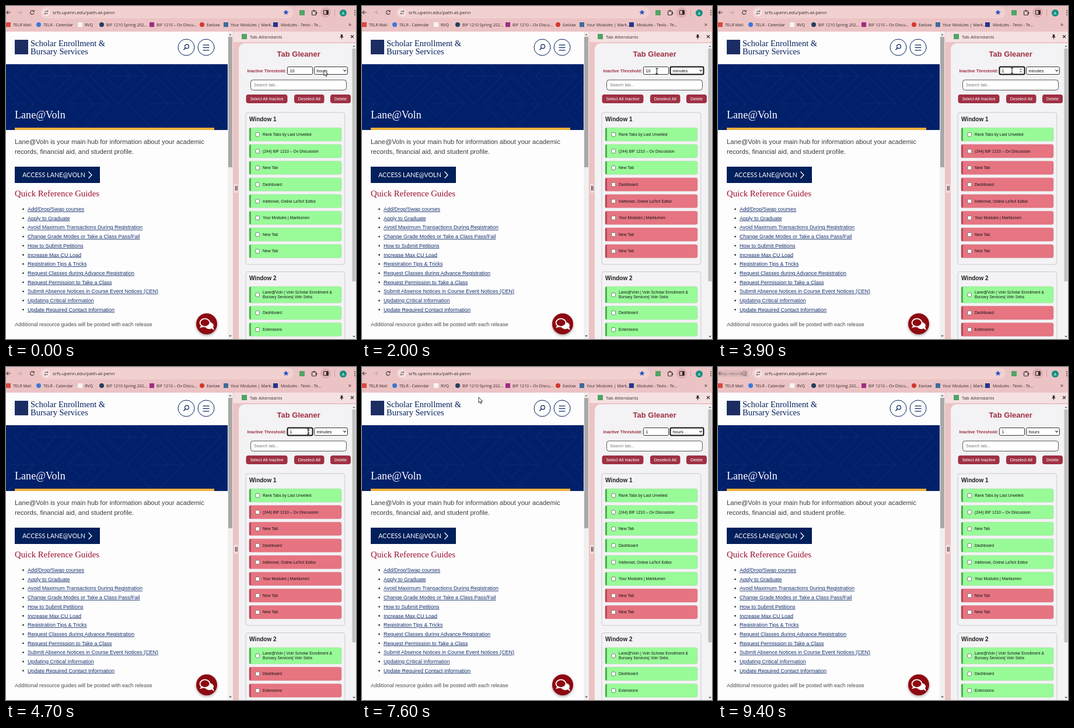
An HTML page for the animation above (9500 ms loop, 600x572 px).

```html
<!DOCTYPE html>
<html lang="en">
<head>
<meta charset="utf-8">
<title>Tab manager demo</title>
<style>
html, body { margin: 0; width: 100%; height: 100%; overflow: hidden; }
#stage { display: block; }
.sans { font-family: "Liberation Sans", Arial, sans-serif; }
.serif { font-family: "Liberation Serif", Times, serif; }
.ui { font-family: "Open Sans", "Noto Sans", sans-serif; }
.label { font-family: Lato, sans-serif; }
.bold { font-weight: 700; }
.link { text-decoration: underline; }
.shadow { filter: drop-shadow(0 2px 2px rgba(0, 0, 0, .35)); }
</style>
</head>
<body>
<svg id="stage" width="600" height="572" viewBox="0 0 600 572">
  <g id="still"></g>
  <g id="live"></g>
</svg>
<script>
const LOOP = 9500;
const NAVY = '#011f5b', MAROON = '#9f3043', PINK = '#ecc3c4', PANEL = '#f3f2f4';

// Moments at which the interface changes
const T = { open: 400, minutes: 1100, focus: 2200, erase: 3700, reopen: 5600, hours: 6800, blur: 9000, tip: 9100 };

// Pointer stops: time, x, y
const stops = [
  [0, 545, 110], [350, 545, 111], [800, 546, 134], [1200, 546, 134], [2100, 504, 111],
  [4000, 504, 111], [4500, 518, 111], [4900, 518, 111], [5500, 560, 109], [5800, 560, 110],
  [6250, 549, 131], [6500, 549, 131], [6750, 546, 141], [6950, 546, 141], [7550, 200, 52],
  [7750, 200, 52], [8100, 185, -16], [LOOP, 185, -16]
];

const bookmarks = [
  [4, '#d94a3d', 'TELR Mail', 12], [56, '#3b78d8', 'TELR - Calendar', 64],
  [127, '#f5f5f5', 'RVQ', 135], [164, '#24405e', 'BIF 1210 Spring 202...', 172],
  [250, '#a02c83', 'BIF 1210 – Ov Discu...', 258], [336, '#d5372d', 'Easlow', 344],
  [377, '#3d6b9d', 'Your Modules | Mark...', 385], [462, '#24358c', 'Modules - Tevio - Te...', 471]
];

const links = [
  'Add/Drop/Swap courses', 'Apply to Graduate', 'Avoid Maximum Transactions During Registration',
  'Change Grade Modes or Take a Class Pass/Fail', 'How to Submit Petitions', 'Increase Max CU Load',
  'Registration Tips & Tricks', 'Request Classes during Advance Registration',
  'Request Permission to Take a Class', 'Submit Absence Notices in Course Event Notices (CEN)',
  'Updating Critical Information', 'Update Required Contact Information'
];

const firstWindow = [
  'Rank Tabs by Last Unveiled', '(244) BIF 1210 – Ov Discussion', 'New Tab', 'Dashboard',
  'Inkfennel, Online LaTeX Editor', 'Your Modules | Marklumen', 'New Tab', 'New Tab'
];

const units = ['seconds', 'minutes', 'hours', 'days'];

const paint = (fill, stroke, width = 1) =>
  `fill="${fill || 'none'}"` + (stroke ? ` stroke="${stroke}" stroke-width="${width}"` : '');
const text = (str, x, y, size, color, style = 'sans', anchor = 'start') =>
  `<text x="${x}" y="${y}" font-size="${size}" fill="${color}" class="${style}" text-anchor="${anchor}">${str.replace(/&/g, '&amp;')}</text>`;
const box = (x, y, w, h, r, ...look) =>
  `<rect x="${x}" y="${y}" width="${w}" height="${h}" rx="${r}" ${paint(...look)}/>`;
const rect = (x, y, w, h, color) => box(x, y, w, h, 0, color);
const oval = (x, y, rx, ry, ...look) =>
  `<ellipse cx="${x}" cy="${y}" rx="${rx}" ry="${ry}" ${paint(...look)}/>`;
const circle = (x, y, r, ...look) => oval(x, y, r, r, ...look);
const poly = (points, fill, stroke, width) =>
  `<poly${fill ? 'gon' : 'line'} points="${points}" ${paint(fill, stroke, width)}/>`;
const each = (list, render) => list.map(render).join('');

// Small triangle pointing up (dir -1) or down (dir 1)
const triangle = (x, y, dir, color, r = 2.5) =>
  poly([x - r, y - dir * r / 2, x + r, y - dir * r / 2, x, y + dir * r / 2], color);

function star(x, y) {
  return poly(Array.from({ length: 10 }, (_, i) => {
    const r = i % 2 ? 2.1 : 5, a = i * Math.PI / 5 - Math.PI / 2;
    return [x + r * Math.cos(a), y + r * Math.sin(a)];
  }), '#1f4fc0');
}

function toolbar() {
  return rect(0, 0, 600, 44, PINK) +
    box(59, 1, 434, 20, 10, '#f1d0d0') +
    poly([8, 11, 1, 11, 4, 8, 1, 11, 4, 14], null, '#4b3f43', 1.1) +
    poly([20, 11, 27, 11, 24, 8, 27, 11, 24, 14], null, '#b89a9d', 1) +
    `<circle cx="45" cy="11" r="3.3" stroke-dasharray="17 9" transform="rotate(20 45 11)" ${paint(null, '#4b3f43', 1.2)}/>` +
    poly([48.8, 6.8, 48.8, 10.3, 45.3, 10.3], '#4b3f43') +
    circle(69, 11, 6.5, '#f8e6e6') +
    each([[9, 71], [13, 67]], ([y, knob]) =>
      poly([66, y, 72, y], null, '#55474a', .9) + circle(knob, y, 1.2, '#f8e6e6', '#55474a', .8)) +
    text('srfs.upenn.edu/path-at-penn', 80, 14, 7.9, '#2f292b', 'ui') +
    star(480, 11) +
    rect(503, 7, 9, 9, '#4fa465') +
    box(524.5, 8.5, 7, 7, 1, null, '#3f3538', 1.2) +
    circle(528, 8, 1.5, '#3f3538') + circle(532, 12, 1.5, '#3f3538') +
    circle(548, 11, 9, '#ddafb2') +
    box(544.5, 7.5, 8, 7, 1, null, '#33292c', 1.1) +
    rect(549, 8, 3, 6, '#33292c') +
    rect(563, 6, 1, 11, '#d79da1') +
    circle(578, 12, 6, '#148f80') +
    text('A', 578, 14.5, 7, '#fff', 'ui', 'middle') +
    each([8, 11.5, 15], y => circle(598, y, .9, '#40363a')) +
    each(bookmarks, ([x, color, label, textX], i) =>
      (i % 2 && i < 6 ? circle(x, 32, 4, color) : rect(x - 4, 28, 8, 8, color)) +
      text(label, textX, 34.6, 7, '#352c30', 'ui')) +
    text('»', 587, 35, 10, '#40363a', 'ui');
}

function hero() {
  const lattice = each([0, 1, 2, 3, 4, 5, 6], i => {
    const x = i * 64, y = i % 2 ? 20 : 68;
    return each([22, 48], r =>
      poly([x - r, y, x, y - r, x + r, y, x, y + r, x - r, y], null, '#0f2f79', 1)) +
      poly([x - 14, y, x + 50, y], null, '#0c2b75', 1);
  });
  return rect(0, 100, 380, 113, '#02206a') +
    `<svg y="100" width="380" height="113">${lattice}</svg>` +
    text('Lane@Voln', 15, 193, 18.1, '#fff', 'serif') +
    rect(15, 209, 342, 4, '#eeb039');
}

function chatButton() {
  return `<g class="shadow">${circle(344, 546, 18, '#8d0911')}</g>` +
    oval(348.5, 549, 7.5, 6, '#fff') +
    poly([351, 553, 357, 557, 354, 549], '#fff') +
    oval(341, 544, 8.5, 6.8, '#8d0911', '#fff', 1.8) +
    poly([335, 548, 332, 553, 339, 551], '#fff');
}

function page() {
  return rect(0, 44, 380, 528, '#fefdfe') +
    rect(15, 58, 23, 25, '#1c2d63') +
    text('Scholar Enrollment &', 42, 69, 14.5, NAVY, 'serif') +
    text('Bursary Services', 42, 83, 14.5, NAVY, 'serif') +
    each([309, 343], x => circle(x, 71, 14, '#fff', NAVY)) +
    circle(310, 69.5, 3.4, null, NAVY, 1.2) +
    poly([307.6, 72, 304.5, 75.5], null, NAVY, 1.3) +
    each([67, 71.5, 76], y => poly([337.5, y, 348.5, y], null, NAVY, 1.2)) +
    hero() +
    text('Lane@Voln is your main hub for information about your academic', 15, 237, 11.2, '#3b3b3f') +
    text('records, financial aid, and student profile.', 15, 254, 11.2, '#3b3b3f') +
    rect(15, 276, 146, 28, NAVY) +
    text('ACCESS LANE@VOLN', 28, 294, 10.8, '#fff', 'label') +
    poly([141.5, 284.5, 147, 290.2, 141.5, 296], null, '#fff', 1.3) +
    text('Quick Reference Guides', 15, 327, 14.75, '#990d2a', 'serif') +
    each(links, (label, i) => {
      const y = 352 + i * 15.7;
      return circle(29.5, y - 3, 1.4, '#333') + text(label, 37, y, 9, '#14306c', 'sans link');
    }) +
    text('Additional resource guides will be posted with each release', 15, 549.5, 9, '#4a4a4e') +
    chatButton() +
    rect(380, 44, 9, 528, '#f1eff0') +
    rect(381, 53, 7, 224, '#a9a8a9') +
    triangle(384.5, 49, -1, '#777') +
    triangle(384.5, 567, 1, '#555');
}

function button(x, w, label) {
  return box(x, 152, w, 15, 4, MAROON) + text(label, x + w / 2, 162.2, 7.3, '#fff', 'sans', 'middle');
}

function panel() {
  return rect(389, 44, 211, 528, PINK) +
    rect(390, 44, 210, 18, '#f5e1e2') +
    rect(404, 48, 9, 9, '#4fa465') +
    text('Tab Attendants', 418, 56, 7.9, '#3a3033', 'ui') +
    poly([573, 49, 578, 49, 577, 50, 577, 52, 579, 54, 572, 54, 574, 52, 574, 50], '#332a2d') +
    poly([575.5, 54, 575.5, 57], null, '#332a2d') +
    poly([591, 50, 596, 55], null, '#332a2d', 1.1) +
    poly([596, 50, 591, 55], null, '#332a2d', 1.1) +
    box(391, 305, 7, 16, 2, '#f3dadb') +
    rect(393, 309, 1.2, 8, '#42373b') +
    rect(395.4, 309, 1.2, 8, '#42373b') +
    box(399, 64, 220, 520, 10, PANEL) +
    rect(592, 64, 8, 508, '#f4f2f3') +
    rect(593.5, 73, 6, 400, '#c1bfc0') +
    triangle(596.5, 69, -1, '#777') +
    triangle(596.5, 568, 1, '#555') +
    text('Tab Gleaner', 501.7, 87, 13, MAROON, 'sans bold', 'middle') +
    text('Inactive Threshold:', 413.5, 114, 7.3, MAROON, 'sans bold') +
    box(419.5, 127, 164, 17.5, 4, '#fff', '#555') +
    text('Search tab...', 425, 138.3, 7.4, '#777') +
    button(411.5, 71, 'Select All Inactive') +
    button(494, 51.5, 'Deselect All') +
    button(556, 35, 'Delete') +
    box(411, 183, 170, 261, 4, PANEL, '#cbc9cc') +
    text('Window 1', 417, 198, 10, '#222', 'sans bold') +
    box(411, 456.5, 170, 140, 4, PANEL, '#cbc9cc') +
    text('Window 2', 417, 471, 10, '#222', 'sans bold');
}

function card(y, h, lines, red) {
  const middle = y + h / 2;
  return box(417, y, 158, h, 3, red ? '#e67481' : '#98fb98', red ? '#d9808a' : '#a0dca0', .6) +
    box(417, y, 3, h, 1.5, red ? '#b44957' : '#4caf50') +
    box(427.9, middle - 3.2, 6.6, 6.6, 1.2, '#fff', '#666', .8) +
    each(lines, (line, i) =>
      text(line, 440, middle + 2.3 + (i - (lines.length - 1) / 2) * 8, 6.75, '#151515'));
}

function cards(t) {
  const stage = [T.minutes, T.erase, T.hours].filter(s => t >= s).length;
  const firstRed = [8, 3, 1, 6][stage];
  return each(firstWindow, (label, i) => card(209.2 + i * 28.65, 22.8, [label], i >= firstRed)) +
    card(482, 28, ['Lane@Voln | Voln Scholar Enrollment &', 'Bursary Services| Voln Sebs'], false) +
    card(515.5, 23, ['Dashboard'], stage === 2) +
    card(544.2, 23, ['Extensions'], stage === 2);
}

function field(x, w, value, focused) {
  return box(x, 104.5, w, 13, 2, '#fff', focused ? '#111' : '#333', focused ? 2 : 1) +
    text(value, x + 4, 113.8, 7.4, '#111');
}

function threshold(t) {
  const inputFocus = t >= T.focus && t < T.reopen;
  const selectFocus = (t >= T.minutes && t < T.focus) || (t >= T.hours && t < T.blur);
  const value = t < T.erase ? '10' : '1';
  const caret = Math.floor((t - T.focus) / 500) % 2 === 0;
  return field(482.5, 43, value, inputFocus) +
    (inputFocus ? triangle(519, 108.8, -1, '#444', 2) + triangle(519, 113.2, 1, '#444', 2) : '') +
    (inputFocus && caret ? rect(486.8 + value.length * 4.1, 107, .8, 8, '#111') : '') +
    field(528.5, 57, t >= T.minutes && t < T.hours ? 'minutes' : 'hours', selectFocus) +
    poly([578.5, 109.7, 580.7, 112, 582.9, 109.7], null, '#222', 1.2);
}

function dropdown(selected) {
  return rect(528, 118, 58, 38.5, '#555') + rect(529, 118.5, 56, 37.5, '#fff') +
    each(units, (unit, i) => {
      const y = 118.3 + i * 9.4, on = i === selected;
      return (on ? rect(529, y, 56, 9.4, '#0b5ccc') : '') +
        text(unit, 533, y + 7.2, 7.3, on ? '#fff' : '#111');
    });
}

function pointerAt(t) {
  const i = stops.findIndex(stop => stop[0] > t);
  const [t0, x0, y0] = stops[i - 1], [t1, x1, y1] = stops[i];
  const u = (t - t0) / (t1 - t0), e = u * u * (3 - 2 * u);
  return [x0 + (x1 - x0) * e, y0 + (y1 - y0) * e];
}

function pointer(x, y, beam) {
  const shape = beam
    ? poly([-2, -4.5, 2, -4.5, 0, -4.5, 0, 4.5, -2, 4.5, 2, 4.5], null, '#111')
    : poly([0, 0, 0, 9.5, 2.2, 7.5, 3.7, 11, 5.2, 10.3, 3.8, 7, 6.8, 7], '#fff', '#222', .9);
  return `<g transform="translate(${x} ${y})">${shape}</g>`;
}

function scene(t) {
  const [x, y] = pointerAt(t);
  const isOpen = (t >= T.open && t < T.minutes) || (t >= T.reopen && t < T.hours);
  const current = t < T.minutes ? 2 : 1;
  const hovered = y > 119 ? Math.floor((y - 118.3) / 9.4) : current;
  const beam = !isOpen && x > 482 && x < 526 && y > 104 && y < 118;
  const tip = rect(0, 5, 52, 12, '#d8b4b6') + text('Stop recording', 1, 13.7, 7.2, '#57494d', 'ui');
  return cards(t) + threshold(t) + (isOpen ? dropdown(hovered) : '') + pointer(x, y, beam) +
    (t >= T.tip ? `<g opacity=".6">${tip}</g>` : '');
}

const live = document.getElementById('live');
let shown = '';

function tick() {
  const next = scene(performance.now() % LOOP);
  if (next !== shown) live.innerHTML = shown = next;
  requestAnimationFrame(tick);
}

document.getElementById('still').innerHTML = toolbar() + page() + panel();
tick();
</script>
</body>
</html>
```
